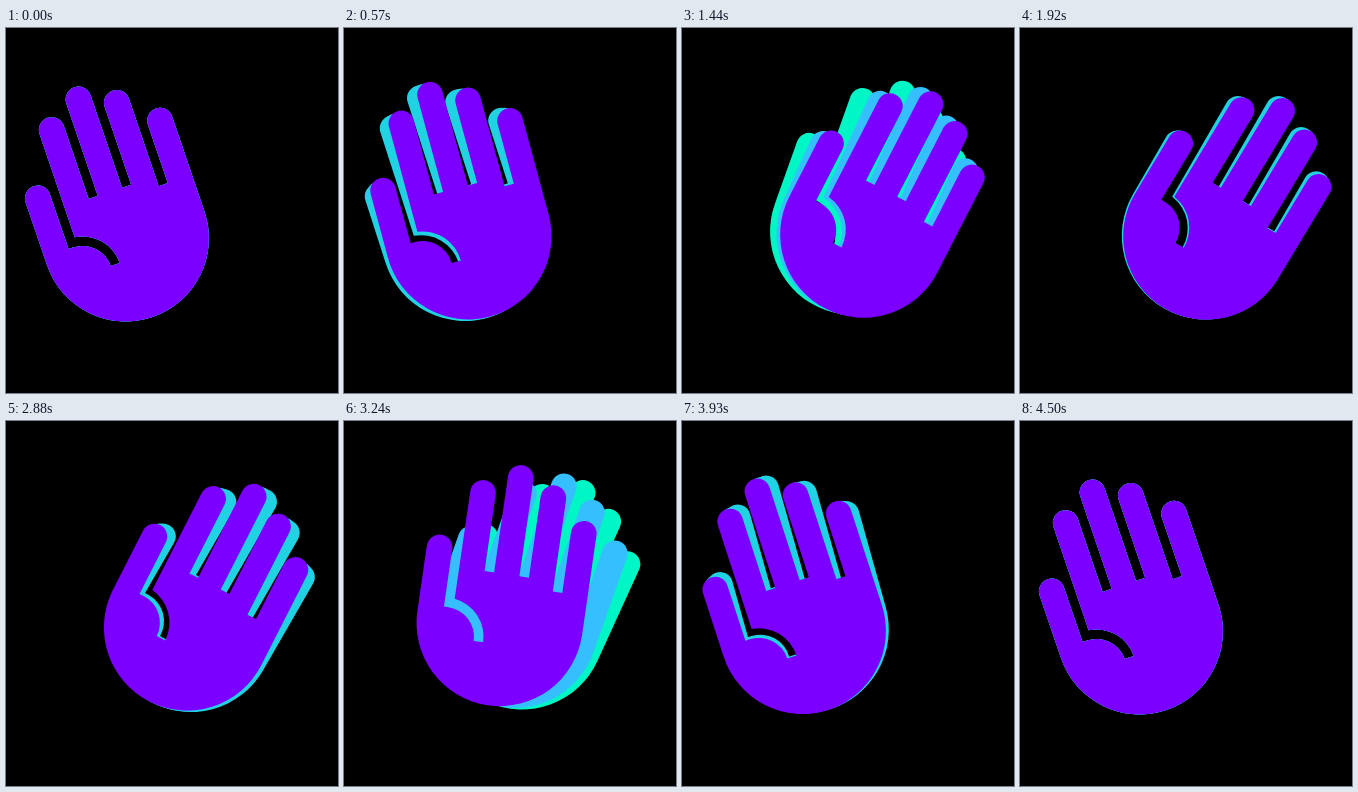
An HTML page that plays this animation: 332x365 px, repeating every 4740 ms.

```html
<!DOCTYPE html>
<html lang="en">
<head>
<meta charset="utf-8">
<title>Waving hand</title>
<style>
  html, body { margin: 0; width: 100%; height: 100%; overflow: hidden; background: #000; }
  svg { display: block; width: 332px; height: 365px; }
</style>
</head>
<body>
<svg viewBox="0 0 332 365">
  <defs>
    <!-- Upright hand, origin at the wrist pivot -->
    <path id="hand" d="M-93.8-144.5a12.8 12.8 0 0 1 25.6 0V-86.5H-63.5
      A29.7 29.7 0 0 1-33.8-56.8h9.6A39.3 39.3 0 0 0-58.6-95.8
      V-204.7a12.8 12.8 0 0 1 25.6 0V-127.5h9.6
      V-225a12.8 12.8 0 0 1 25.6 0V-127.3h9.6
      V-209.5a12.8 12.8 0 0 1 25.6 0V-117h9.6
      V-178.7a12.8 12.8 0 0 1 25.6 0V-78.3
      A83.2 83.2 0 0 1-93.8-78.3z"/>
  </defs>
  <use href="#hand"/>
  <use href="#hand"/>
  <use href="#hand"/>
</svg>
<script>
const LOOP = 4740, SWING = 2030, RETURN_AT = 2225;
const REST_ANGLE = -18.8, SWEEP = 50;
const TRAIL_BLEND = '#20d2e2';
const colors = ['#00f6c4', '#36bfff', '#7b00ff'];
const lags = [250, 122, 0];
const layers = document.querySelectorAll('svg > use');

const clamp = v => Math.min(1, Math.max(0, v));

// cubic-bezier(x1, 0, x2, 1), solved by bisection
const bezier = (x1, x2) => x => {
  let low = 0, high = 1, s = 0.5;
  x = clamp(x);
  if (x === 0 || x === 1) return x;
  for (let i = 0; i < 24; i++) {
    s = (low + high) / 2;
    const at = 3 * x1 * s * (1 - s) ** 2 + 3 * x2 * s * s * (1 - s) + s ** 3;
    if (at < x) low = s; else high = s;
  }
  return s * s * (3 - 2 * s);
};
const swingOut = bezier(0.75, 0.25);
const swingBack = bezier(0.84, 0.18);

const angleAt = t =>
  REST_ANGLE + SWEEP * (swingOut(t / SWING) - swingBack((t - RETURN_AT) / SWING));

const start = performance.now();

function draw() {
  const t = (performance.now() - start) % LOOP;
  const angles = lags.map(lag => angleAt(t - lag));
  // Narrow trails merge into one cyan tone
  const split = 100 * clamp((Math.abs(angles[2] - angles[0]) - 3.5) / 2);
  layers.forEach((layer, i) => {
    layer.setAttribute('transform', `translate(155 281) rotate(${angles[i]})`);
    layer.style.fill = i === 2 ? colors[i]
      : `color-mix(in srgb, ${colors[i]} ${split}%, ${TRAIL_BLEND})`;
  });
  requestAnimationFrame(draw);
}
draw();
</script>
</body>
</html>
```
